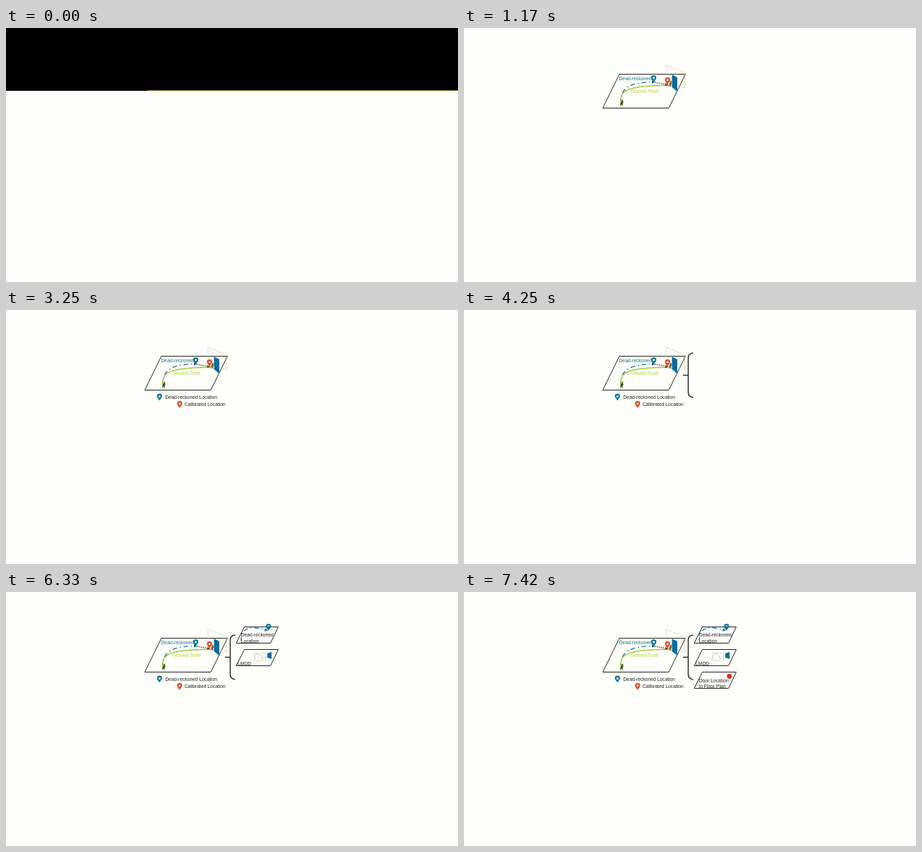
Write an HTML page that moves like this. It is 640 px wide and 360 px high and loops after 8 s.

```html
<!DOCTYPE html>
<html lang="en">
<head>
<meta charset="utf-8">
<style>
  html, body { margin: 0; width: 100%; height: 100%; overflow: hidden; background: #fefefb; }
  svg { display: block; width: 640px; height: 360px; }
  text { font: 6.75px "Liberation Sans", Arial, sans-serif; fill: #24241c; }
  .plane { fill: none; stroke: #24241c; }
  .track { fill: none; stroke: #0b749c; stroke-width: 1.3; stroke-dasharray: 6.5 4 1.5 4; stroke-dashoffset: 6; }
  .blue { fill: #086b9c; }
  .dots { fill: none; stroke: #b8b56c; stroke-width: .9; stroke-dasharray: 1 1.2; }
  .teal { fill: #0a769a; }
  .orange { fill: #dc4a1c; }
</style>
</head>
<body>
<svg viewBox="0 0 640 360">
  <defs>
    <!-- Pin with its tip at the origin -->
    <path id="pin" fill-rule="evenodd" d="M0 0C-1-2.7-3.7-4-3.7-6.3a3.7 3.7 0 0 1 7.4 0C3.7-4 1-2.7 0 0ZM-1.5-6.2a1.5 1.5 0 0 0 3 0a1.5 1.5 0 0 0-3 0Z"/>
    <path id="card" class="plane" d="M337.5 .5H385.5L374.5 23.5H326Z"/>
    <path id="arrow" class="blue" d="M4.5 0L0-2.2V2.2Z"/>
    <g id="walker">
      <circle cx=".8" cy="-5.6" r="1.1"/>
      <path d="M-1-4L1.6-4.5L2.4-2.5L1-1.8L1.4 1.5H.2L-.5-.8L-1.6 1.5H-2.6L-1.4-1.6Z"/>
    </g>
  </defs>

  <g data-start="1000">
    <path class="plane" d="M220 65.5H313.5L290 113.5H196.5Z"/>
    <path class="dots" d="M286 75V53L312.5 63V85Z"/>
    <path class="track" d="M268 76.5C236 77 221 84 222 107"/>
    <use href="#arrow" x="266" y="76.5"/>
    <path d="M222 110C219 87 231 82 288 81.2" fill="none" stroke="#9fcc27" stroke-width="1.4"/>
    <path d="M270 77L287 80" fill="none" stroke="#a33a18" stroke-width="1.5" stroke-dasharray="1.6 1.3"/>
    <path d="M285.5 77.8L290 81L284.5 82Z" fill="#7b4a14"/>
    <path class="blue" d="M294.5 66L302 70V90L294.5 84Z"/>
    <use href="#walker" x="223.5" y="108.5" fill="#35402c"/>
    <use href="#walker" x="292" y="81.5" fill="#6b5528"/>
    <use href="#pin" class="teal" x="268.7" y="77"/>
    <use href="#pin" class="orange" x="288.2" y="80"/>
    <text x="219.5" y="74.3" style="fill:#17738c">Dead-reckoned</text>
    <text x="235.7" y="92.3" style="fill:#a8d32c">Ground Truth</text>
  </g>

  <g data-start="2000">
    <use href="#pin" class="teal" x="217.3" y="128.6"/>
    <text x="225.5" y="125.5">Dead-reckoned Location</text>
  </g>

  <g data-start="3080">
    <use href="#pin" class="orange" x="245.8" y="139"/>
    <text x="252.7" y="135.8">Calibrated Location</text>
  </g>

  <g data-start="4080">
    <path d="M324.5 61Q317.5 61.5 317.5 68V117Q317.5 123 324.5 124M310 92.5H317.5" fill="none" stroke="#2b2b24" stroke-width="1.5"/>
  </g>

  <g data-start="5170">
    <use href="#card" y="49"/>
    <path class="track" d="M368 53.5C344 48 333 50 333 69"/>
    <use href="#arrow" transform="translate(366.5 53.3) rotate(14)"/>
    <use href="#pin" class="teal" x="371.7" y="55"/>
    <text x="332.7" y="63.3">Dead-reckoned</text>
    <text x="332.7" y="71.5">Location</text>
  </g>

  <g data-start="6170">
    <use href="#card" y="81"/>
    <path class="dots" d="M351.5 86.5H367.5V97.5H351.5Z"/>
    <path class="dots" d="M353 94Q353 87 357 88T362 93T368 91" style="stroke:#75816f"/>
    <path class="blue" d="M370 87L376 85V95L370 93Z"/>
    <text x="328" y="104">LMDD</text>
  </g>

  <g data-start="7250">
    <use href="#card" y="113"/>
    <circle cx="375.6" cy="119.5" r="3.4" fill="#e52a18"/>
    <text x="332.7" y="127.8">Door Location</text>
    <text x="332.7" y="136">in Floor Plan</text>
  </g>

  <g id="cover">
    <path d="M0 0H640V88H201V89H0Z"/>
    <path d="M201 88.5H640" stroke="#7a6a10"/>
  </g>
</svg>
<script>
  const LOOP = 8000, STEP = 80, STEPS = 3;
  const parts = [...document.querySelectorAll("[data-start]")];
  const cover = document.getElementById("cover");

  // Each part dissolves in over three hard steps.
  function render(t) {
    cover.style.display = t < 80 ? "" : "none";
    for (const part of parts) {
      const step = Math.floor((t - part.dataset.start) / STEP) + 1;
      part.style.opacity = Math.max(0, Math.min(1, step / STEPS));
    }
  }

  const start = performance.now();
  function tick() {
    render((performance.now() - start) % LOOP);
    requestAnimationFrame(tick);
  }
  tick();
</script>
</body>
</html>
```
